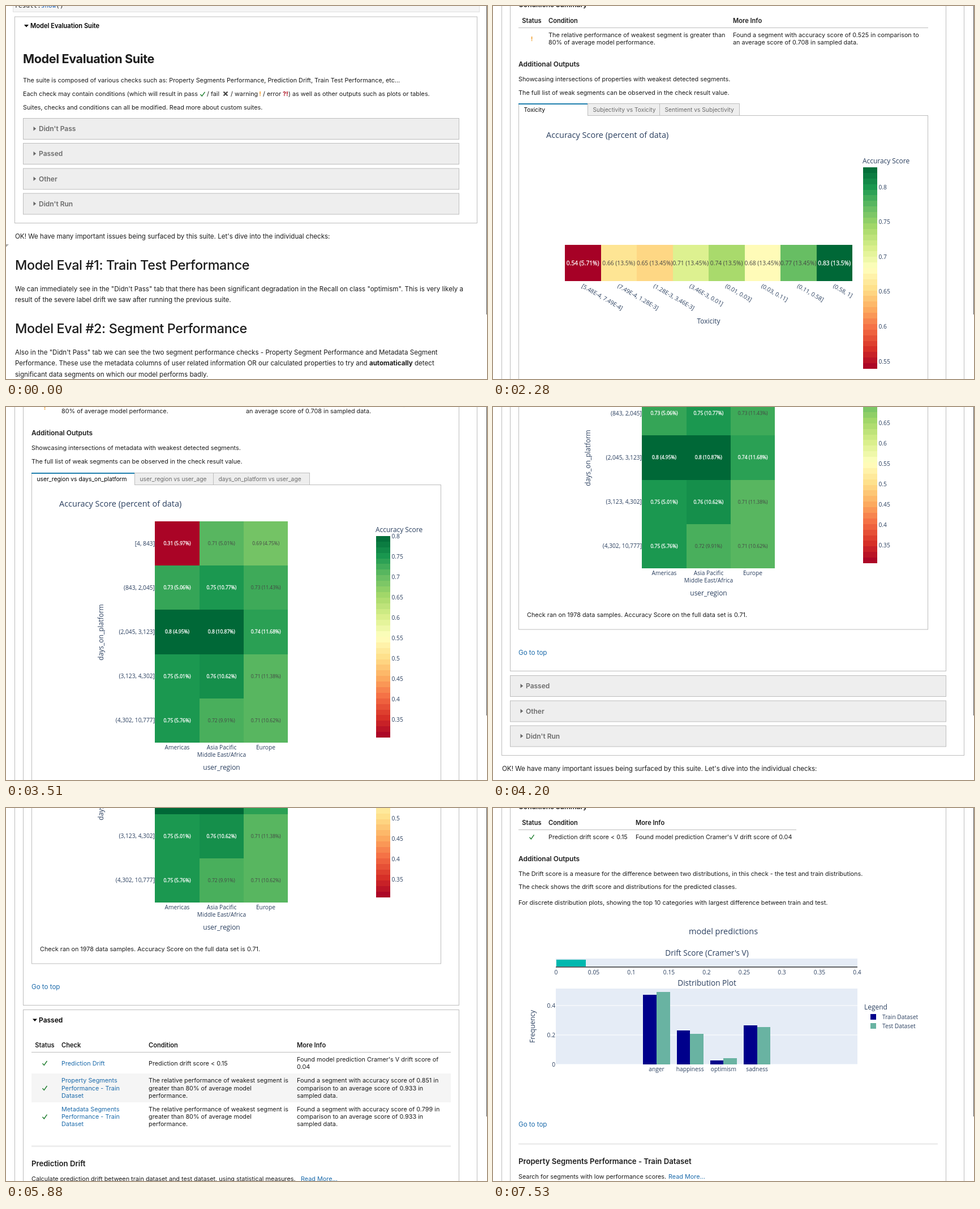
Animation of 850 by 659 pixels, one loop 7890 ms. Source, as an HTML page:

```html
<!DOCTYPE html>
<html lang="en">
<head>
<meta charset="utf-8">
<title>Model evaluation report</title>
<style>
html, body { margin: 0; width: 100%; height: 100%; overflow: hidden; background: #fff; }
svg { display: block; width: 850px; height: 659px; }
text { font: 10.84px Inter, "Noto Sans", sans-serif; font-optical-sizing: none; fill: #1c1c1c; }
.body { font-size: 11.58px; }
.h1 { font-size: 23.4px; font-weight: 500; letter-spacing: -.016em; }
.h2 { font-size: 21.6px; font-weight: 700; letter-spacing: -.018em; }
.h3 { font-size: 13.15px; font-weight: 600; }
.h4 { font-size: 12px; font-weight: 600; }
.th { font-size: 11.1px; font-weight: 600; }
.tab { font-size: 10.25px; }
.b { font-weight: 700; }
.link { fill: #1c6bab; }
.top { font-size: 11.58px; fill: #1c6bab; }
.grey { fill: #6b6b6b; }
.black { fill: #000; }
.code { font: 11px "DejaVu Sans Mono", monospace; }
.p8, .p10, .p12, .p13, .p14 { font: 10.24px "Open Sans", sans-serif; fill: #2a3f5f; }
.p8 { font-size: 8.53px; }
.p12 { font-size: 11.94px; }
.p13 { font-size: 13.65px; }
.p14 { font-size: 14.5px; }
.light { fill: #fff; stroke: #fff; stroke-width: .3px; }
.dark { fill: #444; }
.m { text-anchor: middle; }
.e { text-anchor: end; }
</style>
</head>
<body>
<svg viewBox="0 0 850 659"><g id="page"></g><path d="M849.5 0V545" stroke="#555"/></svg>
<script>
const LOOP = 7890, STEP = 30, FAR = 9000;

// y is the middle of the capitals
const text = (x, y, s, cls = '', attrs = '') =>
  `<text x="${x}" y="${y}" dy=".36em" class="${cls}" ${attrs}>${s}</text>`;
const rect = (x, y, w, h, fill, stroke) =>
  `<rect x="${x}" y="${y}" width="${w}" height="${h}" fill="${fill}" ` +
  (stroke ? `stroke="${stroke}"/>` : 'shape-rendering="crispEdges"/>');
const path = (d, stroke, width = 1) =>
  `<path d="${d}" fill="none" stroke="${stroke}" stroke-width="${width}"/>`;
const shape = (d, fill) => `<path d="${d}" fill="${fill}"/>`;
const lines = (x, y, list, cls, gap = 13.2) =>
  list.map((s, i) => text(x, y + i * gap, s, cls)).join('');
const down = (x, y) => shape(`M${x} ${y - 2.5}h8l-4 4.6z`, '#000');
const rule = y => rect(45, y - 1.5, 741, 3, '#eee');
const goTop = y => text(45, y, 'Go to top', 'top');

const icons = {
  pass: (x, y) => path(`M${x - 4} ${y + .5}l2.8 3.2 5.2-7.4`, '#1c7c2c', 1.4),
  fail: (x, y) => path(`M${x - 3.5} ${y - 3.5}l7 7m0-7l-7 7`, '#444', 2.2),
  warn: (x, y) => text(x, y, '!', 'b m', 'style="fill:#f0a030"')
};

// ---- colour scale ----
const scale = ['a50026', 'd73027', 'f46d43', 'fdae61', 'fee08b', 'ffffbf',
  'd9ef8b', 'a6d96a', '66bd63', '1a9850', '006837']
  .map(h => [0, 2, 4].map(i => parseInt(h.slice(i, i + 2), 16)));
function colour(u) {
  const p = Math.max(0, Math.min(.9999, u)) * 10, i = Math.floor(p);
  return `rgb(${scale[i].map((c, k) => Math.round(c + (scale[i + 1][k] - c) * (p - i)))})`;
}
const ink = u => u < .05 || u > .858 ? ' light' : ' dark';

function colourBar(y, lo, hi, first, last) {
  const n = 36, h = 356;
  let s = text(653, y - 11, 'Accuracy Score', 'p12');
  for (let i = 0; i < n; i++)
    s += rect(653.5, y + i * h / n, 25.5, h / n + .3, colour(1 - (i + .5) / n));
  for (let v = first; v < last + .01; v += .05)
    s += text(681.5, y + h * (hi - v) / (hi - lo), +v.toFixed(2), 'p10');
  return s;
}

function tabs(y, edges, names, bottom) {
  let s = rect(45.5, y + 21.5, 723, bottom - y - 21.5, '#fff', '#bdbdbd');
  names.forEach((name, i) => {
    const x = edges[i] + .5, w = edges[i + 1] - edges[i];
    s += i ? rect(x, y + .5, w, 21, '#eee', '#bdbdbd')
      : rect(x, y + .5, w, 21, '#fff', '#bdbdbd') + rect(x + .5, y + 20, w - 1, 3, '#fff') +
        rect(x - .5, y, w + 1, 2, '#1f7fae');
    s += text(x + 9, y + 11.5, name, i ? 'tab grey' : 'tab black');
  });
  return s + text(60, bottom - 26, 'Check ran on 1978 data samples. Accuracy Score on the full data set is 0.71.');
}

// ---- notebook parts ----
function panel(y, name, state = 'closed') {
  const open = state === 'open', lit = state !== 'closed';
  return rect(30.5, y + .5, 770, open ? FAR : 37, lit ? '#fff' : '#eee', '#bdbdbd') +
    (open ? down(47, y + 19) : shape(`M48.5 ${y + 15}v7.6l4.6-3.8z`, lit ? '#000' : '#666')) +
    text(58, y + 19, name, lit ? 'h4 black' : 'h4 grey');
}

// rows: [icon, lines, lines, ...]; y is the middle of the header
function table(y, heads, xs, right, rows, hot = -1) {
  let s = text(68.5, y, 'Status', 'th m'), top = y + 13;
  heads.forEach((h, i) => s += text(xs[i], y, h, 'th'));
  rows.forEach(([icon, ...cells], r) => {
    const h = 11 + 13.2 * Math.max(...cells.map(c => c.length)), mid = top + h / 2;
    if (r === hot || r % 2) s += rect(45, top, right - 45, h, r === hot ? '#e1f5fe' : '#f5f5f5');
    s += icons[icon](68.5, mid);
    cells.forEach((c, i) => s += lines(xs[i], mid - 6.6 * (c.length - 1), c,
      heads[i] === 'Check' ? 'link' : ''));
    top += h;
  });
  return s + path(`M45 ${y + 12.5}H${right}`, '#bdbdbd');
}

const summary = (y, rows, hot) =>
  table(y + 63, ['Check', 'Condition', 'More Info'], [98, 252, 514], 786, rows, hot) + rule(y + 241);

const weak = (icon, kind, set, score, mean) => [icon,
  [kind + ' Segments', `Performance - ${set}`, 'Dataset'],
  ['The relative performance of weakest segment is', 'greater than 80% of average model', 'performance.'],
  [`Found a segment with accuracy score of ${score} in`, `comparison to an average score of ${mean} in`, 'sampled data.']];

const intro = (y, title, desc, linkX) => text(45, y, title, 'h3') + text(45, y + 27, desc) +
  text(linkX, y + 27, 'Read More...', 'link') + text(45, y + 66, 'Conditions Summary', 'h4');

function weakSection(y, kind, noun, score) {
  return intro(y, kind + ' Segments Performance - Test Dataset',
      'Search for segments with low performance scores.', 310) +
    table(y + 94, ['Condition', 'More Info'], [98, 424], 769, [['warn',
      ['The relative performance of weakest segment is greater than', '80% of average model performance.'],
      [`Found a segment with accuracy score of ${score} in comparison to`, 'an average score of 0.708 in sampled data.']]]) +
    text(45, y + 171, 'Additional Outputs', 'h4') +
    lines(45, y + 197, [`Showcasing intersections of ${noun} with weakest detected segments.`,
      'The full list of weak segments can be observed in the check result value.'], '', 24);
}

// ---- charts ----
function toxicityChart() {
  const lo = .5394, hi = .8284;
  const cells = ['0.54 (5.71%)', '0.66 (13.5%)', '0.65 (13.45%)', '0.71 (13.45%)',
    '0.74 (13.5%)', '0.68 (13.45%)', '0.77 (13.45%)', '0.83 (13.5%)'];
  const ranges = ['[5.48E-4, 7.49E-4]', '(7.49E-4, 1.28E-3]', '(1.28E-3, 3.46E-3]', '(3.46E-3, 0.01]',
    '(0.01, 0.03]', '(0.03, 0.11]', '(0.11, 0.58]', '(0.58, 1]'];
  let s = tabs(172, [45, 167, 294, 435], ['Toxicity', 'Subjectivity vs Toxicity', 'Sentiment vs Subjectivity'], 757) +
    text(94, 228, 'Accuracy Score (percent of data)', 'p14') + colourBar(285, lo, hi, .55, .8);
  cells.forEach((c, i) => {
    const x = 127 + 63.5 * i, u = (parseFloat(c) - lo) / (hi - lo);
    s += rect(x, 422, 63.5, 64, colour(u)) +
      text(0, 0, ranges[i], 'p10', `transform="translate(${x + 30.5} 493.5) rotate(30)"`);
  });
  cells.forEach((c, i) => s += text(158.7 + 63.5 * i, 454, c,
    'p10 m' + ink((parseFloat(c) - lo) / (hi - lo))));
  return s + text(381, 557, 'Toxicity', 'p12 m');
}

function regionChart(y) {
  const lo = .3055, hi = .8, w = 78.33;
  const rows = [
    ['[4, 843]', '0.31 (5.97%)', '0.71 (5.01%)', '0.69 (4.75%)'],
    ['(843, 2,045]', '0.73 (5.06%)', '0.75 (10.77%)', '0.73 (11.43%)'],
    ['(2,045, 3,123]', '0.8 (4.95%)', '0.8 (10.87%)', '0.74 (11.68%)'],
    ['(3,123, 4,302]', '0.75 (5.01%)', '0.76 (10.62%)', '0.71 (11.38%)'],
    ['(4,302, 10,777]', '0.75 (5.76%)', '0.72 (9.91%)', '0.71 (10.62%)']];
  let s = tabs(y + 116, [45, 227, 366, 536],
      ['user_region vs days_on_platform', 'user_region vs user_age', 'days_on_platform vs user_age'], y + 701) +
    text(94, y + 171, 'Accuracy Score (percent of data)', 'p14') + colourBar(y + 228, lo, hi, .35, .8);
  rows.forEach(([label, ...cells], r) => {
    const mid = y + 241 + 78.2 * r;
    s += text(263, mid, label, 'p10 e');
    cells.forEach((c, i) => {
      // the two 0.73 cells differ beyond the printed digits
      const v = parseFloat(c) + (r === 1 ? [.003, 0, -.003][i] : 0), u = (v - lo) / (hi - lo);
      s += rect(263.3 + w * i, mid - 39, w, 78.2, colour(u)) +
        text(302.5 + w * i, mid, c, 'p8 m' + ink(u));
    });
  });
  return s + text(302.5, y + 601, 'Americas', 'p10 m') + text(381, y + 601, 'Asia Pacific', 'p10 m') +
    text(381, y + 614, 'Middle East/Africa', 'p10 m') + text(459, y + 601, 'Europe', 'p10 m') +
    text(381, y + 637, 'user_region', 'p12 m') +
    text(0, 0, 'days_on_platform', 'p12 m', `transform="translate(168 ${y + 398}) rotate(-90)"`);
}

function driftChart(y) {
  const navy = '#00008b', sage = '#69b3a2', back = '#e5ecf6';
  let s = text(407, y + 218, 'model predictions', 'p14 m') +
    text(378, y + 256, "Drift Score (Cramer's V)", 'p13 m') + text(378, y + 309, 'Distribution Plot', 'p13 m') +
    rect(111, y + 266, 533, 15, back) + rect(112, y + 268, 52, 12, '#00b8ae') +
    path(`M111 ${y + 281}H644`, '#333', 1.6) + rect(111, y + 319, 533, 134, back);
  for (let i = 0; i < 9; i++) s += text(111.5 + 66.5 * i, y + 290, +(i * .05).toFixed(2), 'p10 m');
  [0, .2, .4].forEach((v, i) => s += path(`M111 ${y + 453 - 52 * i}H644`, '#fff') +
    text(110, y + 453.5 - 52 * i, v, 'p10 e'));
  [['anger', 123, 128], ['happiness', 60, 54], ['optimism', 7, 11], ['sadness', 69, 66.5]]
    .forEach(([name, a, b], i) => {
      const x = 289 + 59.2 * i;
      s += rect(x - 23.7, y + 453 - a, 23.7, a, navy) + rect(x, y + 453 - b, 23.7, b, sage) +
        text(x, y + 461, name, 'p10 m');
    });
  return s + text(0, 0, 'Frequency', 'p12 m', `transform="translate(70 ${y + 386}) rotate(-90)"`) +
    text(656, y + 352, 'Legend', 'p12') +
    rect(667, y + 364, 10, 10, navy) + text(688, y + 369, 'Train Dataset', 'p10') +
    rect(667, y + 380, 10, 10, sage) + text(688, y + 385, 'Test Dataset', 'p10');
}

// ---- pages ----
const outer = (y, h) => rect(15.5, y + .5, 817, h, '#fff', '#bdbdbd');

// collapsed panels and the prose after the report
function tail(y, hover, mark) {
  return panel(y, 'Passed', hover ? 'hover' : 'closed') + panel(y + 44.5, 'Other') + panel(y + 88.5, "Didn't Run") +
    (mark ? shape(`M0 ${y + 179}h5l-5 5z`, '#aaa') : '') +
    text(16, y + 164.5, "OK! We have many important issues being surfaced by this suite. Let's dive into the individual checks:", 'body') +
    text(16, y + 216, 'Model Eval #1: Train Test Performance', 'h1') +
    lines(16, y + 257.5, [
      'We can immediately see in the "Didn\'t Pass" tab that there has been significant degradation in the Recall on class "optimism". This is very likely a',
      'result of the severe label drift we saw after running the previous suite.'], 'body', 19.5) +
    text(16, y + 328, 'Model Eval #2: Segment Performance', 'h1') +
    lines(16, y + 369.5, [
      'Also in the "Didn\'t Pass" tab we can see the two segment performance checks - Property Segment Performance and Metadata Segment',
      'Performance. These use the metadata columns of user related information OR our calculated properties to try and <tspan class="b">automatically</tspan> detect',
      'significant data segments on which our model performs badly.'], 'body', 19.5);
}

function startPage({ state = 'closed', hot, mark }) {
  const open = state === 'open';
  let s = rect(12.5, -20.5, 824, 31, '#f5f5f5', '#e0e0e0') +
    text(15.5, -1, 'result.<tspan fill="#1f62b5">show</tspan>()', 'code') +
    outer(18.5, open ? FAR : 364.5) + down(32, 35.5) + text(43, 35, 'Model Evaluation Suite', 'th black') +
    text(30, 93.5, 'Model Evaluation Suite', 'h2') +
    text(30, 131.5, 'The suite is composed of various checks such as: Property Segments Performance, Prediction Drift, Train Test Performance, etc...') +
    text(30, 155.5, 'Each check may contain conditions (which will result in pass') + icons.pass(347.5, 155.5) +
    text(355, 155.5, '/ fail') + icons.fail(388, 155) + text(397, 155.5, '/ warning') + icons.warn(449, 155.5) +
    text(454, 155.5, '/ error') + text(489, 155.5, '?!', 'b', 'style="fill:#b01828"') +
    text(499, 155.5, ') as well as other outputs such as plots or tables.') +
    text(30, 179, 'Suites, checks and conditions can all be modified. Read more about custom suites.') +
    panel(198, "Didn't Pass", state);
  if (!open) return s + tail(242, false, mark);
  return s + summary(198, [
      ['fail', ['Train Test', 'Performance'], ['Train-Test scores relative degradation is less', 'than 0.1'],
        ['1 scores failed. Found max degradation of 41.67%', 'for metric Recall and class optimism.']],
      weak('warn', 'Property', 'Test', '0.525', '0.708'), weak('warn', 'Metadata', 'Test', '0.305', '0.708')], hot) +
    intro(470, 'Train Test Performance', 'Summarize given model performance on the train and test datasets.', 400) +
    table(564, ['Condition', 'More Info'], [98, 424], 769, [['fail',
      ['Train-Test scores relative degradation is less than 0.1'],
      ['1 scores failed. Found max degradation of 41.67%']]]) +
    text(45, 628, 'Additional Outputs', 'h4');
}

function checksPage({ state = 'closed', hot }) {
  const open = state === 'open', y = 1770;
  let s = outer(-300, open ? FAR : 2211) + rect(30.5, -300, 770, 2062.5, '#fff', '#bdbdbd') +
    weakSection(-68, 'Property', 'properties', '0.525') + toxicityChart() + goTop(798) + rule(832) +
    weakSection(863, 'Metadata', 'metadata', '0.305') + regionChart(988) + goTop(1729.5);
  if (!open) return s + tail(y, state === 'hover');
  return s + panel(y, 'Passed', 'open') + summary(y, [
      ['pass', ['Prediction Drift'], ['Prediction drift score &lt; 0.15'],
        ["Found model prediction Cramer's V drift score of", '0.04']],
      weak('pass', 'Property', 'Train', '0.851', '0.933'), weak('pass', 'Metadata', 'Train', '0.799', '0.933')], hot) +
    intro(2042, 'Prediction Drift',
      'Calculate prediction drift between train dataset and test dataset, using statistical measures.', 521) +
    table(2136, ['Condition', 'More Info'], [98, 252], 536, [['pass',
      ['Prediction drift score &lt; 0.15'], ["Found model prediction Cramer's V drift score of 0.04"]]]) +
    text(45, 2200, 'Additional Outputs', 'h4') +
    text(45, 2226, 'The Drift score is a measure for the difference between two distributions, in this check - the test and train distributions.') +
    text(45, 2249.5, 'The check shows the drift score and distributions for the predicted classes.') +
    text(45, 2277, 'For discrete distribution plots, showing the top 10 categories with largest difference between train and test.') +
    driftChart(2110) + goTop(2669) + rule(2703) +
    intro(2734, 'Property Segments Performance - Train Dataset', 'Search for segments with low performance scores.', 310);
}

// ---- timeline ----
const scenes = [
  [0, startPage, { mark: true }],
  [60, startPage, {}],
  [1320, startPage, { state: 'hover' }],
  [1350, startPage, { state: 'open' }],
  [1620, startPage, { state: 'open', hot: 0 }],
  [1710, startPage, { state: 'open', hot: 1 }],
  [2280, checksPage, {}],
  [4920, checksPage, { state: 'hover' }],
  [5370, checksPage, { state: 'open' }],
  [6060, checksPage, { state: 'open', hot: 0 }],
  [6900, checksPage, { state: 'open' }]
];

// start, end, from, to, ease-out power
const scrolls = [
  [2280, 2880, 0, 419, 2.5],
  [3240, 4050, 419, 1100, 4.45],
  [4050, 4410, 1100, 1414, 1.82],
  [5880, 6240, 1414, 1490, 2],
  [6900, 6901, 2110, 2110, 1]
];
function scrollAt(t) {
  const s = scrolls.filter(k => k[0] <= t).pop();
  if (!s) return 0;
  const [t0, t1, from, to, power] = s, u = Math.min(1, (t - t0) / (t1 - t0));
  return Math.round(from + (to - from) * (1 - (1 - u) ** power));
}

const page = document.getElementById('page');
let shown;
function draw(now) {
  const t = Math.floor(now % LOOP / STEP) * STEP;
  const scene = scenes.filter(s => s[0] <= t).pop();
  if (scene !== shown) {
    shown = scene;
    page.innerHTML = scene[1](scene[2]);
  }
  page.setAttribute('transform', `translate(0 ${-scrollAt(t)})`);
}
let start;
function tick(now) {
  start ??= now;
  draw(now - start);
  requestAnimationFrame(tick);
}
draw(0);
requestAnimationFrame(tick);
</script>
</body>
</html>
```
